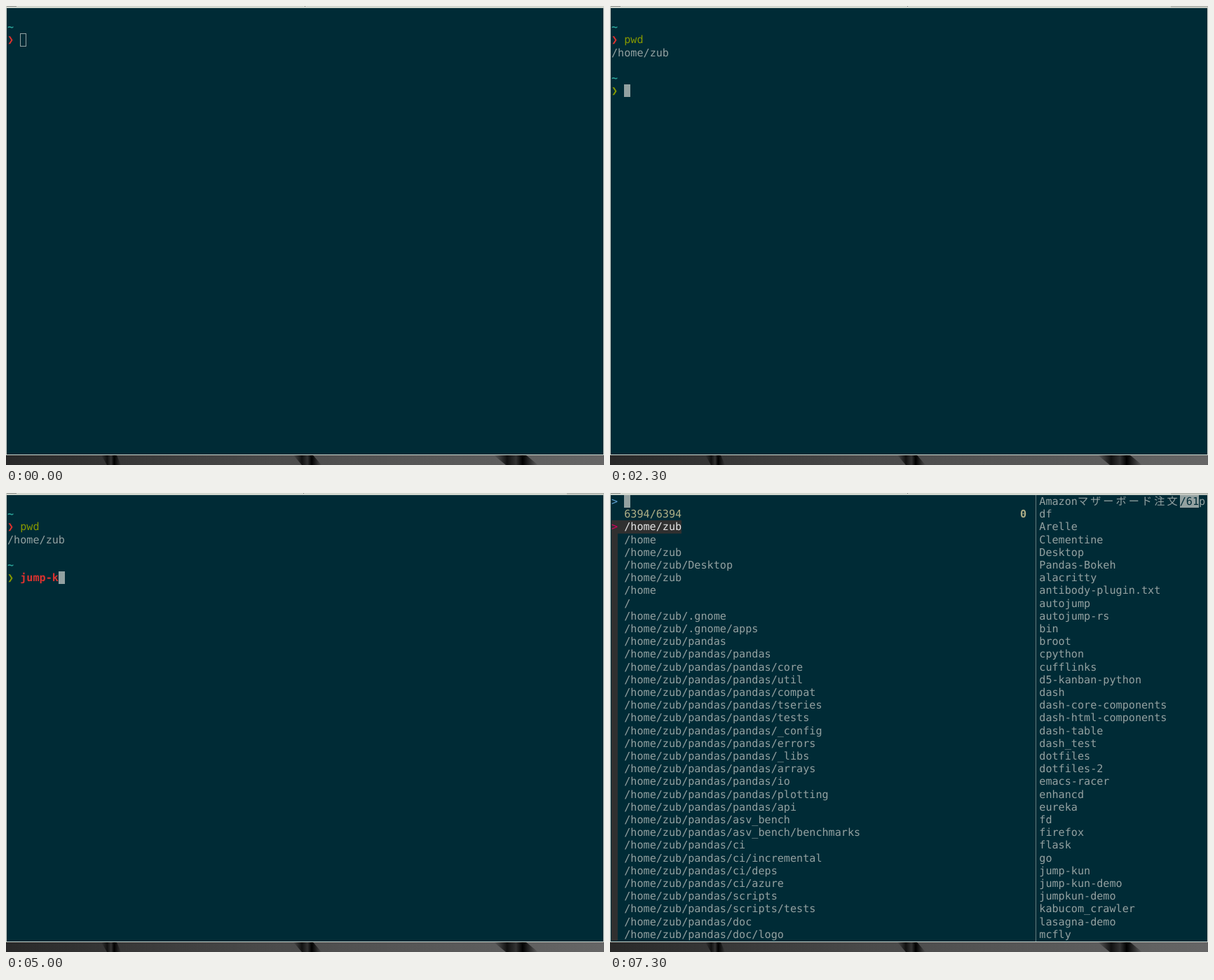
An HTML page for the animation above (8000 ms loop, 853x656 px).

```html
<!DOCTYPE html>
<html lang="en">
<head>
<meta charset="utf-8">
<title>Terminal directory jump</title>
<style>
  :root {
    --bg: #002b36; --fg: #93a1a1; --red: #dc322f; --green: #859900; --cyan: #2aa198;
    --cell: 9.109px; --row: 18.2px;
  }
  html, body { margin: 0; width: 100%; height: 100%; overflow: hidden; }
  body { position: relative; background: linear-gradient(90deg, #292929, #4b4b4b 45%, #666); }
  #wall { position: absolute; left: 0; top: 642px; }
  #win { position: absolute; left: 0; top: 0; width: 853px; height: 642px; background: #d3d7cf; }
  #win i { position: absolute; top: 0; }
  #menu { left: 1px; width: 14px; height: 1px; background: #8b8e89; }
  #mark { left: 426px; width: 1px; height: 1px; background: #777; }
  #tab { left: 800px; width: 53px; height: 2px; background: #b4b8b1; }
  #term {
    position: absolute; left: 1px; top: 3px; width: 851px; height: 637.5px;
    overflow: hidden; background: var(--bg); color: var(--fg);
    font: 15.13px/18.2px "DejaVu Sans Mono", "Noto Sans CJK JP", monospace;
    text-rendering: geometricPrecision; font-variant-ligatures: none;
  }
  #term div { position: absolute; inset: 0; }
  #term span {
    position: absolute; white-space: pre; height: var(--row);
    left: calc(1px + var(--c) * var(--cell)); top: calc(var(--r) * var(--row));
  }
  #term b.wide { font-weight: normal; letter-spacing: calc(2ch - 1em); }
  .red { color: var(--red); }
  .green { color: var(--green); }
  .cyan { color: var(--cyan); }
  .blue { color: #5f9fd0; }
  .info { color: #afaf87; }
  .point { color: #d7005f; }
  .bold { font-weight: bold; }
  .pick { color: #e4e4e4; background: #303030; }
  .inv { color: var(--bg); background: var(--fg); }
  .cursor { width: var(--cell); background: var(--fg); }
  .cursor.hollow { background: none; box-shadow: inset 0 0 0 1px var(--fg); }
  .gutter { width: var(--cell); background: #303030; height: 601px !important; }
  .rule { width: 1px; background: #657b7d; height: 638px !important; }
</style>
</head>
<body>
<svg id="wall" width="853" height="14">
  <defs>
    <linearGradient id="shade" x2="1" y2="0">
      <stop offset="0" stop-color="#111" stop-opacity="0"/>
      <stop offset=".3" stop-color="#111"/>
      <stop offset=".5" stop-color="#333"/>
      <stop offset=".65" stop-color="#000"/>
      <stop offset="1" stop-color="#000" stop-opacity="0"/>
    </linearGradient>
  </defs>
  <g fill="url(#shade)">
    <path d="M136 0h22l6 14h-20z"/>
    <path d="M410 0h28l12 14h-28z"/>
    <path d="M696 0h46l17 14h-46z"/>
  </g>
</svg>
<div id="win">
  <i id="menu"></i><i id="mark"></i><i id="tab"></i>
  <div id="term">
    <div id="shell"></div>
    <div id="finder"></div>
  </div>
</div>
<script>
const LOOP = 8000, HOME = '/home/zub';
const $ = id => document.getElementById(id);

function put(box, row, col, text, cls = '') {
  const el = document.createElement('span');
  el.className = cls;
  el.textContent = text;
  el.style.setProperty('--r', row);
  el.style.setProperty('--c', col);
  return box.appendChild(el);
}

// [start ms, typed characters, colour]
const first = [[0, 0, 'red'], [1500, 1, 'red'], [1800, 2, 'red'], [1900, 3, 'green']];
const second = [
  [2300, 0, 'red'], [3800, 1, 'red'], [4000, 2, 'red'], [4200, 3, 'red'], [4400, 4, 'red'],
  [4600, 5, 'red'], [5000, 6, 'red'], [5200, 7, 'red'], [5400, 8, 'green'], [5600, 9, 'red'],
  [5900, 10, 'red'], [6100, 11, 'red'], [6300, 13, 'green']
];
const at = (steps, t) => steps.filter(s => s[0] <= t).pop();

const shell = $('shell');
function prompt(row, cls) {
  return [put(shell, row - 1, 0, '~', 'cyan bold'), put(shell, row, 0, '❯', cls + ' bold')];
}
prompt(2, 'red');
const later = [put(shell, 3, 0, HOME), ...prompt(6, 'green')];
const lineA = put(shell, 2, 2, ''), lineB = put(shell, 6, 2, '');
const cursor = put(shell, 2, 2, '', 'cursor');

function type(el, text, step) {
  const [, n, cls] = step;
  el.textContent = text.slice(0, n);
  el.className = cls + (cls === 'red' ? ' bold' : '');
  return n;
}

const pandas = ['', '/pandas', ...'core util compat tseries tests _config errors _libs arrays io plotting api'
  .split(' ').map(d => '/pandas/' + d),
  ...'asv_bench asv_bench/benchmarks ci ci/incremental ci/deps ci/azure scripts scripts/tests doc doc/logo'
  .split(' ').map(d => '/' + d)].map(d => HOME + '/pandas' + d);
const paths = ['/home', HOME, HOME + '/Desktop', HOME, '/home', '/',
  HOME + '/.gnome', HOME + '/.gnome/apps', ...pandas];
const files = `df Arelle Clementine Desktop Pandas-Bokeh alacritty antibody-plugin.txt autojump
  autojump-rs bin broot cpython cufflinks d5-kanban-python dash dash-core-components
  dash-html-components dash-table dash_test dotfiles dotfiles-2 emacs-racer enhancd eureka fd
  firefox flask go jump-kun jump-kun-demo jumpkun-demo kabucom_crawler lasagna-demo mcfly`.split(/\s+/);

const finder = $('finder');
put(finder, 2, 0, '', 'gutter');
put(finder, 0, 0, '>', 'blue');
put(finder, 0, 2, '', 'cursor');
put(finder, 1, 2, '6394/6394', 'info');
put(finder, 1, 64, '0', 'info bold');
put(finder, 2, 0, '>', 'point');
put(finder, 2, 1, ' ' + HOME, 'pick');
paths.forEach((p, i) => put(finder, i + 3, 2, p));
put(finder, 0, 66.45, '', 'rule');
put(finder, 0, 67, 'Amazon');
const wide = document.createElement('b');
wide.className = 'wide';
wide.textContent = 'マザーボード注文';
put(finder, 0, 73, '').append(wide);
put(finder, 0, 89, '/61', 'inv');
put(finder, 0, 92, 'p');
files.forEach((f, i) => put(finder, i + 1, 67, f));

function draw(t) {
  const open = t >= 7300, ran = t >= 2300, focus = t >= 200;
  finder.hidden = !open;
  shell.hidden = open;
  later.forEach(el => el.hidden = !ran);
  let n = type(lineA, 'pwd', at(first, t));
  if (ran) n = type(lineB, 'jump-kun-jump', at(second, t));
  else lineB.textContent = '';
  cursor.style.setProperty('--r', ran ? 6 : 2);
  cursor.style.setProperty('--c', 2 + n);
  cursor.classList.toggle('hollow', !focus);
  $('tab').hidden = !focus;
  $('mark').style.left = (focus ? 424 : 426) + 'px';
}

const start = performance.now();
function tick() {
  draw((performance.now() - start) % LOOP);
  requestAnimationFrame(tick);
}
draw(0);
tick();
</script>
</body>
</html>
```
